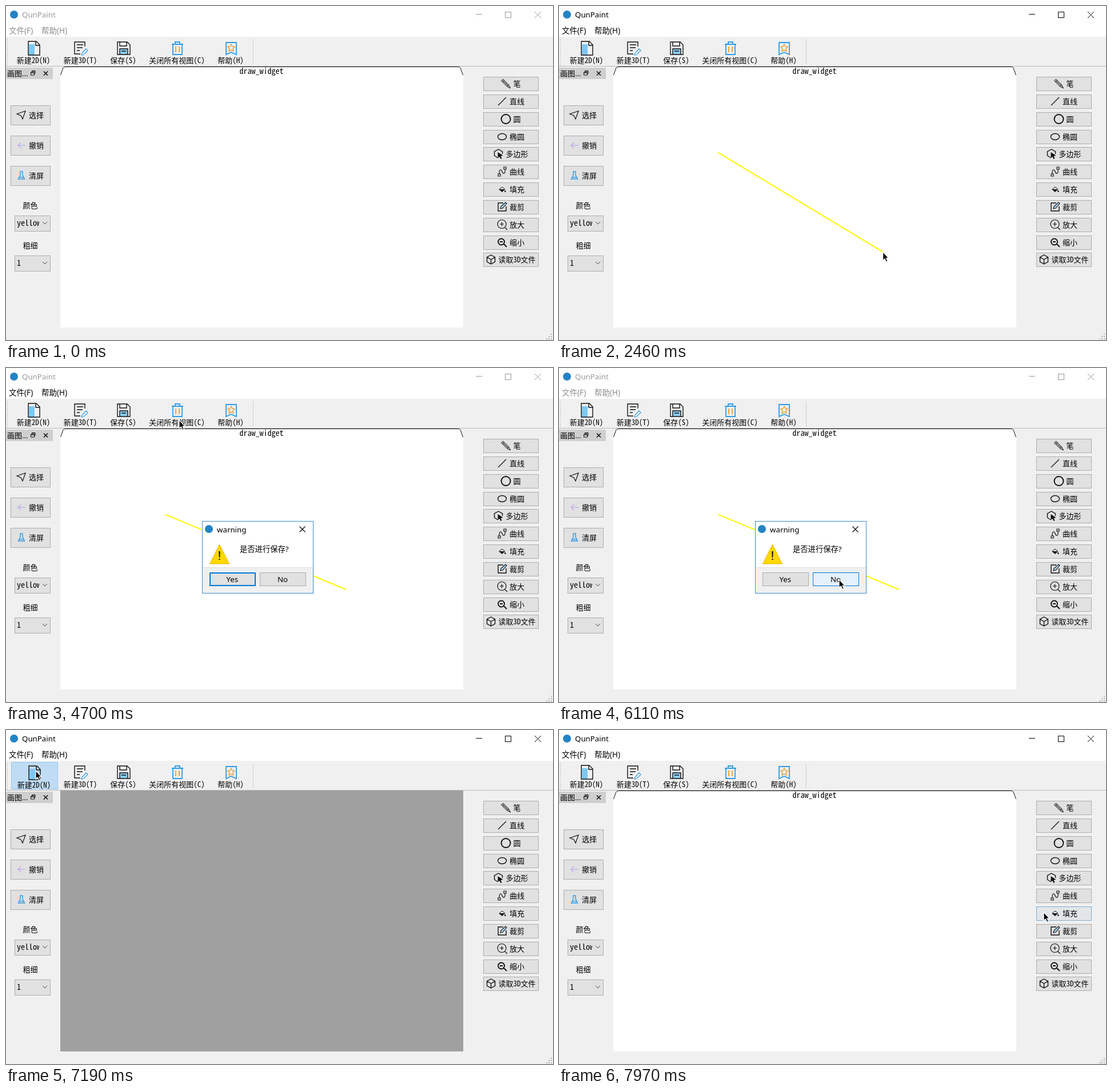
These frames come from a looping animation (957 px wide and 585 px high, 8000 ms). An HTML page with a canvas:

```html
<!DOCTYPE html>
<html lang="zh">
<head>
<meta charset="utf-8">
<style>
html, body { margin: 0; width: 957px; height: 585px; overflow: hidden; }
canvas { display: block; }
</style>
</head>
<body>
<canvas id="stage" width="957" height="585"></canvas>
<script>
const ctx = document.getElementById('stage').getContext('2d');
const LOOP = 8000, BLUE = '#0078d7', SKY = '#2f9be6', ORANGE = '#f2a33a', INK = '#111';
const UI = '"Noto Sans", "Noto Sans CJK SC", sans-serif';
const MONO = '"Noto Sans Mono CJK SC", "Noto Sans CJK SC", monospace';

// Pointer moves: start, end, number of steps, points passed after the previous position
const moves = [
  [140, 920, 11, [890, 350], [884, 166]],
  [1000, 1460, 7, [763, 212], [376, 286], [278, 257]],
  [1610, 1610, 1, [317, 290]],
  [1690, 2230, 8, [550, 430]],
  [2380, 2770, 6, [575, 431], [595, 388]],
  [2930, 3150, 4, [537, 336]],
  [3230, 3230, 1, [516, 325]],
  [3310, 3610, 5, [505, 280], [525, 236]],
  [3930, 4470, 8, [430, 150], [303, 91]],
  [4780, 5480, 10, [400, 250], [490, 370]],
  [6410, 6640, 4, [30, 42]],
  [6810, 6960, 3, [52, 71]],
  [7510, 7970, 7, [330, 200], [640, 300], [848, 319]]
];

function pointer(t) {
  let at = [910, 543];
  for (const [start, end, steps, ...points] of moves) {
    if (t < start) break;
    const step = t >= end ? steps : 1 + Math.floor((t - start) / (end - start) * (steps - 1));
    const path = [at, ...points], f = step / steps * points.length;
    const i = Math.min(Math.floor(f), points.length - 1);
    at = path[i].map((v, k) => v + (path[i + 1][k] - v) * (f - i));
  }
  return at;
}

const within = (t, a, b) => t >= a && t < b;
const dialogOpen = t => within(t, 4700, 6180);

function hits(t, x, y, w, h) {
  const [px, py] = pointer(t);
  return t >= 140 && within(px, x, x + w) && within(py, y, y + h);
}

function box(x, y, w, h, fill, stroke, width = 1) {
  if (fill) { ctx.fillStyle = fill; ctx.fillRect(x, y, w, h); }
  if (!stroke) return;
  ctx.strokeStyle = stroke;
  ctx.lineWidth = width;
  ctx.strokeRect(x + width / 2, y + width / 2, w - width, h - width);
}

function shape(x, y, d, stroke, width = 1, fill) {
  const p = new Path2D(d);
  ctx.save();
  ctx.translate(x, y);
  if (fill) { ctx.fillStyle = fill; ctx.fill(p); }
  if (stroke) { ctx.strokeStyle = stroke; ctx.lineWidth = width; ctx.stroke(p); }
  ctx.restore();
}

function disc(x, y, r, color) {
  ctx.fillStyle = color;
  ctx.beginPath();
  ctx.arc(x, y, r, 0, 7);
  ctx.fill();
}

function label(text, x, y, color = '#000', size = 13.3) {
  ctx.font = `${size}px ${UI}`;
  ctx.fillStyle = color;
  ctx.fillText(text, x, y);
}

// Full-width Chinese with half-width Latin
function mono(text, x, y, align = 'left', size = 13) {
  ctx.font = `${size}px ${MONO}`;
  ctx.fillStyle = '#000';
  ctx.textAlign = align;
  ctx.fillText(text, x, y);
  ctx.textAlign = 'left';
}

function button(t, x, y, w, h, enabled = true) {
  box(x, y, w, h, '#e1e1e1', '#adadad');
  if (!enabled) return;
  ctx.globalAlpha = [0, 70, 140].filter(d => hits(t - d, x, y, w, h)).length / 3;
  box(x, y, w, h, '#e5f1fb', BLUE);
  ctx.globalAlpha = 1;
}

const cross = (x, y, r, color, width) => shape(x, y, `M${-r} ${-r}L${r} ${r}M${r} ${-r}L${-r} ${r}`, color, width);

// Icons: lists of [path, stroke, width, fill] around their own centre
const toolbar = [
  ['新建2D(N)', 9, 82, 48, [
    ['M-9 -7H1V12H-9Z', null, 0, '#7cc8f5'],
    ['M-10 -12H4L10 -6V12H-10ZM3 -12V-5H10', INK, 1.4]]],
  ['新建3D(T)', 91, 79, 130, [
    ['M7 -3V-11H-11V10H-1M-7 -6H4M-7 -1H3M-7 4H-2', INK, 1.4],
    ['M2 9L9 1 12 4 5 11 1 12Z', SKY, 1.2, '#fff']]],
  ['保存(S)', 173, 63, 205, [
    ['M-7 1H7V11H-7Z', null, 0, '#8ccdf5'],
    ['M-11 -11H6L11 -6V11H-11ZM-7 -11V-4H5V-11M-7 11V1H7V11M-4 5H4', INK, 1.4]]],
  ['关闭所有视图(C)', 240, 118, 299, [
    ['M-10 -7H10M-4 -7V-11H4V-7M-8 -7V11H8V-7', SKY, 1.8],
    ['M-3 -3V7M3 -3V7', ORANGE, 2]]],
  ['帮助(H)', 361, 64, 393, [
    ['M-9 -10H9V11L0 7 -9 11Z', SKY, 1.8],
    ['M0 -7L2 -3 6 -2.5 3 .5 4 5 0 3 -4 5 -3 .5 -6 -2.5 -2 -3Z', ORANGE, 1.5]]]
];
const side = [
  ['选择', [['M7 -7L2 7 -1 1 -8 -2Z', INK, 1.2]]],
  ['撤销', [['M-6 0H7', '#a9b8f0', 1.4], ['M-1 -5L-6 0 -1 5', '#cda6ea', 1.4]]],
  ['清屏', [['M-2.5 -7H2.5M-2 -7V-1L-5.5 6H5.5L2 -1V-7M-4 3H4', SKY, 1.4]]]
];
const tools = [
  ['笔', [['M-8 -5L-5 -8 5 2 8 8 2 5ZM-6 -3L-3 -6M-5 -5L4 4M2 5L5 2', INK, 1, '#bbb']]],
  ['直线', [['M-7 7L7 -7', INK, 1.2]]],
  ['圆', [['M8 0A8 8 0 1 1 -8 0A8 8 0 1 1 8 0', INK, 1.9]]],
  ['椭圆', [['M7.5 0A7.5 5.5 0 1 1 -7.5 0A7.5 5.5 0 1 1 7.5 0', INK, 1.4]]],
  ['多边形', [['M-1 7L-7 3V-4L0 -8 7 -4V0', INK, 1.4], ['M-1 -3L8 3 4 4 6 8 4 9 2 5 -1 7Z', null, 0, INK]]],
  ['曲线', [['M-7 4H-3V8H-7ZM3 -8H7V-4H3ZM-5 4C-5 -7 -1 -3 0 0S6 7 5 -4', INK, 1.2]]],
  ['填充', [['M-6 0H5L0 5ZM5 1Q8 5 5.5 5T5 1', null, 0, INK], ['M-5 0L0 -4 5 0', INK, 1]]],
  ['裁剪', [['M2 -7H-7V7H7V-1', INK, 1.4], ['M-3 3L-2 -1 6 -8 8 -6 1 2Z', INK, 1.1, '#a9d4f0']]],
  ['放大', [['M7 -1A7.5 7.5 0 1 1 -8 -1A7.5 7.5 0 1 1 7 -1M5 5L9 9M-4 -1H3M-.5 -4.5V2.5', INK, 1.2]]],
  ['缩小', [['M4 -1A5.5 5.5 0 1 1 -7 -1A5.5 5.5 0 1 1 4 -1M3 3L8 8M-4 -1H1', INK, 1.9]]],
  ['读取3D文件', [['M0 -8L7 -4V4L0 8 -7 4V-4ZM-7 -4L0 0 7 -4M0 0V8', INK, 1.4]]]
];
const icon = (x, y, parts) => parts.forEach(part => shape(x, y, ...part));

function drawFrame(t) {
  box(0, 0, 957, 585, '#f0f0f0');
  box(0, 0, 957, 54, '#fff');

  const titleColor = within(t, 1000, 4700) || t >= 6180 ? '#000' : '#999';
  const menuColor = within(t, 1000, 4780) || t >= 6180 ? '#000' : '#8c8c8c';
  disc(14, 15, 7, '#2383c4');
  label('QunPaint', 28, 20, titleColor);
  box(822, 14, 11, 1, titleColor);
  box(873, 10, 11, 11, null, titleColor);
  cross(930.5, 15.5, 5.5, titleColor, 1);
  if (!dialogOpen(t) && hits(t, 0, 32, 53, 22)) box(0, 32, 53, 22, '#e5f3ff', '#cce8ff');
  label('文件(F)', 5, 48, menuColor, 13.5);
  label('帮助(H)', 62, 48, menuColor, 13.5);
}

function drawToolbar(t) {
  box(0, 105, 957, 1, '#b9b9b9');
  box(432, 59, 1, 43, '#d0d0d0');
  for (let y = 58; y < 103; y += 4) box(2, y, 1, 2, '#bdbdbd');
  for (const [name, x, w, center, parts] of toolbar) {
    const over = !dialogOpen(t) && hits(t, x, 56, w, 48);
    const pressed = over && (within(t, 4550, 4700) || within(t, 7110, 7340));
    if (over) box(x, 56, w, 48, pressed ? '#c0dcf3' : '#d8e6f2', pressed ? '#90c8f6' : '#c0dcf3');
    const shift = pressed ? 1 : 0;
    icon(center + 1 + shift, 74 + shift, parts);
    mono(name, center + shift, 100 + shift, 'center');
  }
}

function drawPanels(t) {
  const enabled = !dialogOpen(t);
  box(0, 108, 82, 20, '#cfcfcf');
  label('画图...', 2, 123, '#000', 13);
  shape(47, 117.5, 'M-3.5 -1.5H2.5V3.5H-3.5ZM-1.5 -1.5V-4H4V1H2.5M-3.5 -.5H2.5M-1.5 -3.5H4', INK);
  cross(69.5, 118, 3.5, INK, 1.6);

  side.forEach(([name, parts], i) => {
    const y = 174 + 53 * i;
    button(t, 8, y, 70, 35, enabled);
    icon(27, y + 17, parts);
    mono(name, 40, y + 22);
  });
  [['颜色', 'yellow'], ['粗细', '1']].forEach(([name, value], i) => {
    const y = 367 + 70 * i;
    mono(name, 42.5, y - 13, 'center');
    box(15, y, 63, 28, '#e1e1e1', '#adadad');
    ctx.save();
    ctx.beginPath();
    ctx.rect(17, y, 41, 28);
    ctx.clip();
    mono(value, 19, y + 18, 'left', 14);
    ctx.restore();
    shape(68, y + 13, 'M-4 -2L0 2 4 -2', '#444');
  });
  tools.forEach(([name, parts], i) => {
    const y = Math.floor(124.6 + 30.83 * i);
    const width = [...name].reduce((sum, c) => sum + (c < '\x7f' ? 6.5 : 13), 0);
    button(t, 835, y, 97, 25, enabled);
    icon(881 - width / 2, y + 12, parts);
    mono(name, 894 - width / 2, y + 17);
  });
  for (let row = 0; row < 3; row++)
    for (let col = 0; col <= row; col++) box(953 - 4 * col, 574 + 4 * row, 2, 2, '#b4b4b4');
}

function drawCanvas(t) {
  if (within(t, 6180, 7340)) return box(95, 106, 705, 457, '#a0a0a0');
  box(95, 121, 705, 442, '#fff');
  shape(0, 0, 'M95.5 121L100 108.5Q101 106.5 104 106.5H791Q794 106.5 795 108.5L799.5 121', INK, 1, '#fff');
  mono('draw_widget', 447, 119, 'center', 14);
  if (!within(t, 1610, 6180)) return;

  const [x0, y0] = [278, 256.4];
  const [x1, y1] = t < 2850 ? pointer(t) : [595, 388];
  shape(0, 0, `M${x0} ${y0}L${x1} ${y1}`, '#ff0', 2);
  if (!within(t, 2850, 3780)) return;
  [[0, '#f00'], [.25, '#0f0'], [.5, '#00e'], [1, '#f00']].forEach(([f, color]) =>
    disc(x0 + (x1 - x0) * f, y0 + (y1 - y0) * f + .4, 4.5, color));
}

function drawDialog(t) {
  box(343, 268, 195, 127, '#fff', '#3a8dd0');
  box(344, 349, 193, 45, '#f0f0f0');
  box(344, 349, 193, 1, '#dfdfdf');
  disc(355, 282, 7, '#2383c4');
  label('warning', 369, 288);
  cross(518.5, 282.5, 5, '#000', 1.1);
  shape(373.5, 326, 'M0 -17L17 17H-17Z', '#f0b400', 1, '#ffd900');
  shape(373.5, 326, 'M-1.2 -5H1.2L.7 6H-.7ZM-1 8H1V10H-1Z', null, 0, '#000');
  label('是否进行保存?', 409, 322);
  button(t, 356, 358, 81, 24);
  button(t, 444, 358, 81, 24);
  if (t < 6110) box(356, 358, 81, 24, null, BLUE, 2);
  label('Yes', 385.5, 375);
  label('No', 475, 375);
}

function draw() {
  const t = performance.now() % LOOP;
  drawFrame(t);
  drawToolbar(t);
  drawPanels(t);
  drawCanvas(t);
  if (dialogOpen(t)) drawDialog(t);
  if (t >= 140) {
    const [x, y] = pointer(t);
    shape(x, y, 'M0 0V15L3.3 12 6 17.5 8.5 16.5 6 11H10Z', '#fff', 1.2, '#000');
  }
  requestAnimationFrame(draw);
}
draw();
</script>
</body>
</html>
```
